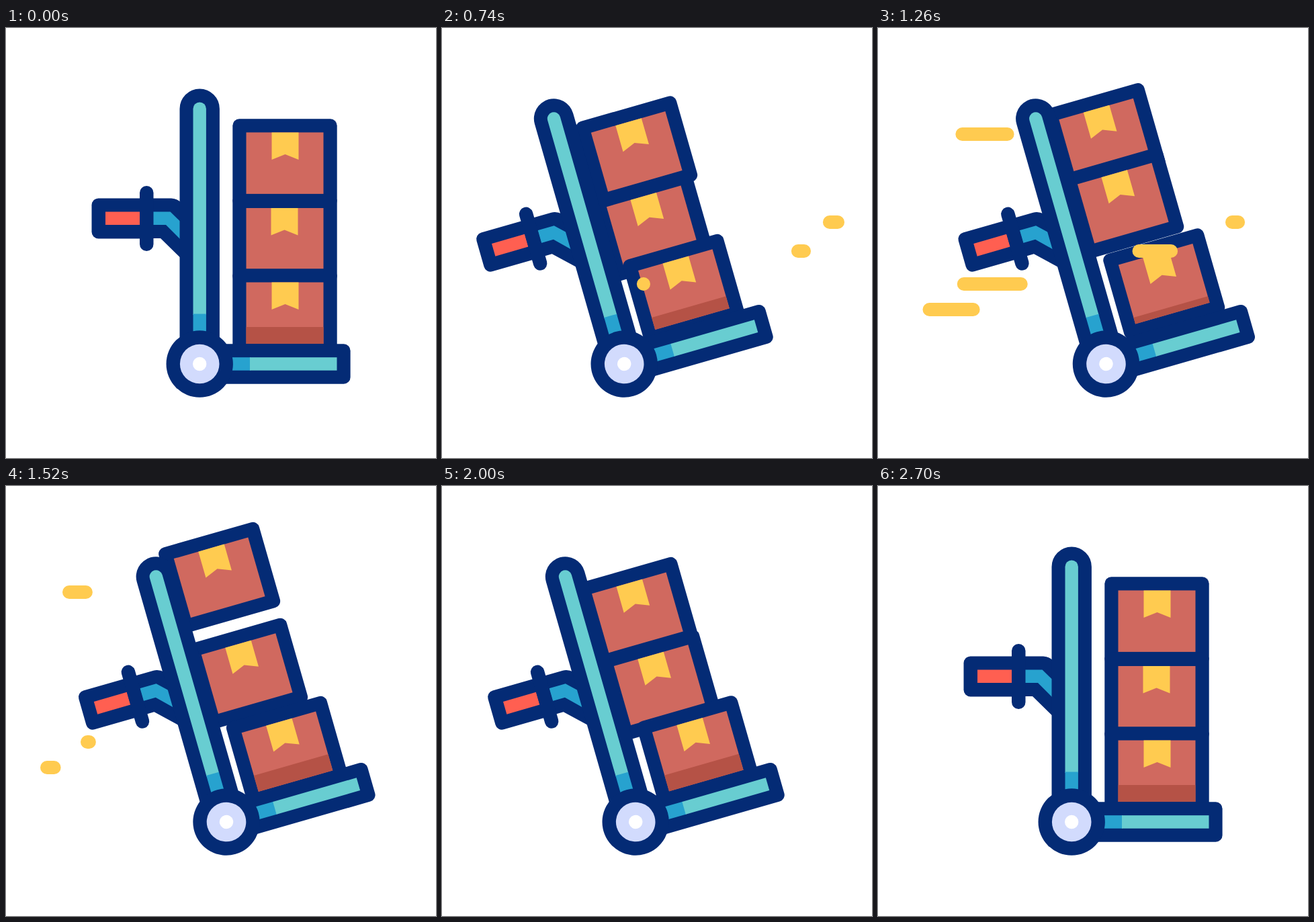
Recreate the animation shown at these times as an HTML page. Size 640 px wide and 640 px high, loop 3 s.

```html
<!DOCTYPE html>
<html lang="en">
<head>
<meta charset="utf-8">
<title>Hand truck</title>
<style>
  html, body { margin: 0; width: 100%; height: 100%; overflow: hidden; background: #fff; }
  svg { display: block; width: 100%; height: 100%; }
  .navy { fill: #042b75; }
  .teal { fill: #68cdd1; }
  .blue { fill: #27a2cf; }
  .dash { stroke: #ffcb50; stroke-width: 20; stroke-linecap: round; }
</style>
</head>
<body>
<svg viewBox="0 0 640 640">
  <g id="truck">
    <g id="boxes"></g>
    <rect class="navy" x="127.5" y="253.5" width="90" height="60" rx="10"/>
    <path class="navy" d="M205 253.5H246Q254 253.5 261 260L280 277V362L230 313H205Z"/>
    <path class="blue" d="M219 273.5H244.500L260 288.500V315L238 293H219Z"/>
    <rect x="148" y="273.500" width="51" height="19.500" fill="#ff5f51"/>
    <rect class="navy" x="199" y="235" width="20.500" height="97" rx="10.250"/>
    <path class="navy" d="M258.500 500V120.200a29.700 29.700 0 0 1 59.400 0V500Z"/>
    <path class="teal" d="M278.500 427V120.200a9.700 9.700 0 0 1 19.400 0V427Z"/>
    <rect class="blue" x="278.500" y="425.500" width="19.400" height="30"/>
    <rect class="navy" x="288" y="470.300" width="224.600" height="59.500" rx="10"/>
    <rect class="blue" x="320" y="490.200" width="44" height="19.500"/>
    <rect class="teal" x="363" y="490.200" width="129.500" height="19.500"/>
    <circle class="navy" cx="288.200" cy="500" r="49.700"/>
    <circle cx="288.200" cy="500" r="29.300" fill="#d2dbfd"/>
    <circle cx="288.200" cy="500" r="10.200" fill="#fff"/>
  </g>
  <g id="dashes"></g>
</svg>
<script>
const LOOP = 3000, STEP = 20;
const AXLE = { x: 288.2, y: 500 };

// Tracks are [time, value] pairs, eased in and out between pairs.
const ROLL = [[200, 0], [600, -25], [1300, 52], [2000, 0]];
const TILT = [[200, 0], [700, 16], [2000, 16], [2400, 0]];

// Listed top box first; lower boxes are painted over upper ones.
const BOXES = [
  { top: 155.4, tab: 38,
    x: [[400, 0], [1000, -36.5], [1500, -36.5], [1900, -38.3], [2200, -38.3], [2700, 0]],
    y: [[1050, 0], [1500, -54], [1950, 0]] },
  { top: 268, tab: 37,
    x: [[300, 0], [900, -36.5], [2000, -36.5], [2600, 0]],
    y: [[800, 0], [1275, -37], [1750, 0]] },
  { top: 378.5, tab: 38, shade: 445,
    x: [[200, 0], [660, -11], [1800, -11], [2500, 0]],
    y: [[600, 0], [1050, -27.5], [1500, 0]] }
];

const DASHES = [
  { y: 158, from: 215, to: 94, start: 860 },
  { y: 289, from: 589, to: 527, start: 570 },
  { y: 332, from: 539, to: 388.5, start: 650 },
  { y: 381, from: 300, to: 121, start: 730 },
  { y: 419, from: 181, to: 61, start: 795 }
];
const DASH_TIME = 600, TAIL_DELAY = 235;

const ease = p => {
  p = Math.min(1, Math.max(0, p));
  return p * p * (3 - 2 * p);
};

function valueAt(track, t) {
  let value = track[0][1];
  for (let i = 1; i < track.length; i++) {
    const [t0, v0] = track[i - 1], [t1, v1] = track[i];
    value += (v1 - v0) * ease((t - t0) / (t1 - t0));
  }
  return value;
}

function add(parent, tag, attrs) {
  const el = document.createElementNS("http://www.w3.org/2000/svg", tag);
  for (const key in attrs) el.setAttribute(key, attrs[key]);
  return parent.appendChild(el);
}

const truck = document.getElementById("truck");
const boxLayer = document.getElementById("boxes");
const dashLayer = document.getElementById("dashes");

for (const box of BOXES) {
  const left = 357.5, width = 115, height = 91.5;
  box.el = add(boxLayer, "g", {});
  add(box.el, "rect", { class: "navy", x: left - 20.2, y: box.top - 20.2,
    width: width + 40.4, height: height + 40.4, rx: 10 });
  add(box.el, "rect", { x: left, y: box.top, width, height, fill: "#d0695f" });
  if (box.shade) {
    box.floor = box.top + height;
    box.shadeEl = add(box.el, "rect", { x: left, width, fill: "#b55246" });
  }
  add(box.el, "path", { fill: "#ffcb50",
    d: `M${left + box.tab} ${box.top}h40v40.500l-20 -8l-20 8Z` });
}

for (const dash of DASHES) {
  dash.el = add(dashLayer, "line", { class: "dash", y1: dash.y, y2: dash.y });
}

function draw(t) {
  const roll = valueAt(ROLL, t), tilt = valueAt(TILT, t);
  truck.setAttribute("transform", `translate(${roll} 0) rotate(${-tilt} ${AXLE.x} ${AXLE.y})`);

  for (const box of BOXES) {
    const x = valueAt(box.x, t), y = valueAt(box.y, t);
    box.el.setAttribute("transform", `translate(${x} ${y})`);
    if (box.shadeEl) {
      // The shade stays level with the truck while the box hops.
      const top = box.shade - y;
      box.shadeEl.setAttribute("y", top);
      box.shadeEl.setAttribute("height", Math.max(0, box.floor - top));
    }
  }

  for (const { el, from, to, start } of DASHES) {
    const head = ease((t - start) / DASH_TIME);
    const tail = ease((t - start - TAIL_DELAY) / DASH_TIME);
    el.setAttribute("x1", from + (to - from) * tail);
    el.setAttribute("x2", from + (to - from) * head);
    el.setAttribute("visibility", head > tail ? "visible" : "hidden");
  }
}

const begin = performance.now();
function tick() {
  const t = (performance.now() - begin) % LOOP;
  draw(Math.floor(t / STEP) * STEP);
  requestAnimationFrame(tick);
}
draw(0);
requestAnimationFrame(tick);
</script>
</body>
</html>
```
